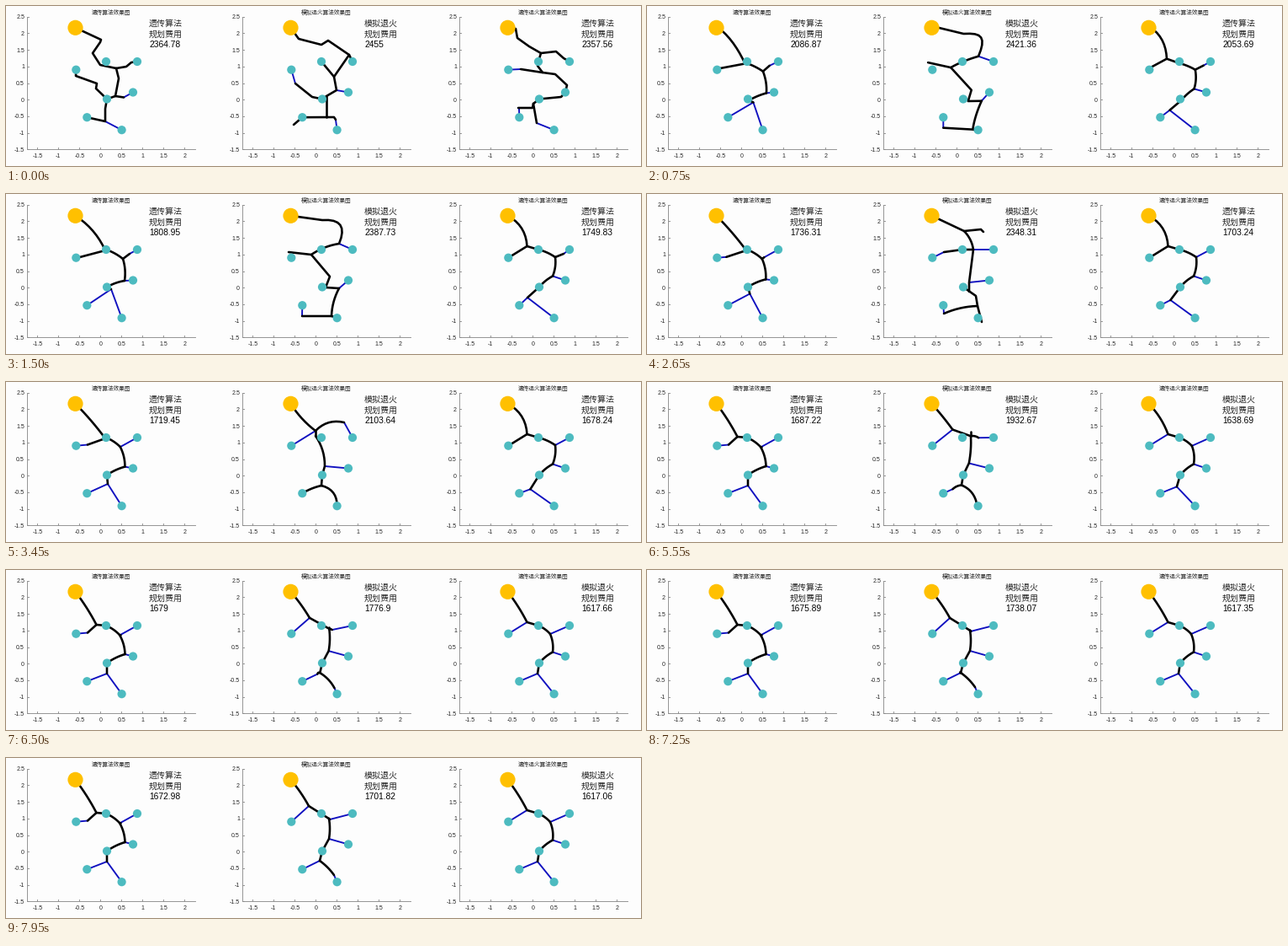
Recreate the animation shown at these times as a matplotlib script. Size 755 by 190 pixels, loop 8000 ms.

```python
import math

import numpy as np
import matplotlib.pyplot as plt
from matplotlib.animation import FuncAnimation
from matplotlib.collections import LineCollection
from matplotlib.patches import Circle

W, H, DPI = 755, 190, 100
STEP, FRAMES = 50, 160
CJK, SANS = "Noto Sans CJK JP", "Liberation Sans"

# the plants, in pixels of the first panel
SUN = (82.5, 25.8)
TOP_L, TOP_R, LEFT, RIGHT = (119, 66), (156, 66), (83.3, 75.7), (151, 102.5)
MID, LOW_L, LOW_R = (120, 110.5), (96.3, 132.2), (137.6, 147.2)
PLANTS = [TOP_L, TOP_R, LEFT, RIGHT, MID, LOW_L, LOW_R]

COST_AT = [0, 1500, 2650, 3450, 4650, 6500, 7950]
REBUILT = 600

fig = plt.figure(figsize=(W / DPI, H / DPI), dpi=DPI, facecolor="#fdfdfd")
ax = fig.add_axes([0, 0, 1, 1])
ax.set_xlim(0, W)
ax.set_ylim(H, 0)
ax.axis("off")


def pt(px):
    return px * 72 / DPI


def put(x, y, s, size, font=SANS, ha="center", color="#262626"):
    return ax.text(x, y, s, fontsize=pt(size), family=font, ha=ha,
                   va="baseline", color=color)


def glide(t, a, b, t0=1500, t1=5000):
    """Ease out from a to b between two times."""
    u = min(max((t - t0) / (t1 - t0), 0), 1)
    return np.array(a, float) + (np.array(b, float) - a) * u * (2 - u)


def via(t, a, b, c):
    return glide(t, a, b, 3450, 4650) if t < 4650 else glide(t, b, c, 4650, 7600)


def bow(p, q, h):
    """Arc from p to q that bulges h pixels to the side."""
    p, q = np.array(p, float), np.array(q, float)
    d = q - p
    side = np.array([d[1], -d[0]]) / max(np.hypot(*d), 1e-6)
    s = np.linspace(0, 1, 9)[:, None]
    return list(p + d * s + side * 4 * h * s * (1 - s))


class Panel:
    def __init__(self, dx, title, label, costs, layout):
        self.dx, self.costs, self.layout = dx, costs, layout
        self.draw_axes()
        put(125 + dx, 10, title, 6.7, CJK)
        self.label = put(190 + dx, 24, label, 10, CJK)
        put(190 + dx, 36.8, "规划费用", 10, CJK)
        self.cost = put(170.7 + dx, 48.8, "", 10.2, ha="left", color="black")
        self.links = LineCollection([], colors="#1010c0", linewidths=pt(1.9),
                                    capstyle="round", zorder=2)
        self.pipes = LineCollection([], colors="black", linewidths=pt(2.6),
                                    capstyle="round", joinstyle="round", zorder=3)
        ax.add_collection(self.links)
        ax.add_collection(self.pipes)
        for x, y in PLANTS:
            ax.add_patch(Circle((x + dx, y), 5.1, fc="#4dbbc0", ec="none", zorder=4))
        ax.add_patch(Circle((SUN[0] + dx, SUN[1]), 9.1, fc="#ffc000", ec="none", zorder=4))

    def draw_axes(self):
        dx = self.dx
        style = dict(color="#8c8c8c", lw=pt(0.9))
        ax.plot([25 + dx, 25 + dx, 225 + dx], [12.7, 170.3, 170.3], **style)
        for v in np.arange(-1.5, 2.1, 0.5):
            x = 112.3 + 50 * v + dx
            ax.plot([x, x], [170.3, 168.3], **style)
            put(x, 179.6, f"{v:g}", 7)
        for v in np.arange(-1.5, 2.6, 0.5):
            y = 111.2 - 39.4 * v
            ax.plot([25 + dx, 27 + dx], [y, y], **style)
            put(22 + dx, y + 2.5, f"{v:g}", 7, ha="right")

    def show(self, t):
        pipes, links = self.layout(t)
        shift = (self.dx, 0)
        self.pipes.set_segments([np.array(p, float) + shift for p in pipes])
        self.links.set_segments([np.array(p, float) + shift for p in links])
        self.cost.set_text(f"{np.interp(t, COST_AT, self.costs):.6g}")


def tree(j, k, m, n, left, right, sag):
    """Spine through the plants with a junction per side branch."""
    pipes = [bow(SUN, j, sag) + [TOP_L], [j, left], bow(TOP_L, k, 1), [k, right],
             bow(k, m, 1.5), bow(m, MID, -1) + [n]]
    links = [(left, LEFT), (right, TOP_R), (m, RIGHT), (n, LOW_L), (n, LOW_R)]
    return pipes, links


def ga_layout(t):
    if t < REBUILT:
        a, b, c = (131, 74), (130, 107), (118, 137)
        return [
            [SUN, (113, 40), (112, 43), (103, 56), (112, 70), a],
            [a, (143, 72), (149, 67), TOP_R],
            [a, (134, 86), b, (140, 108.5)],
            [b, MID, (118, 122), c, LOW_L],
            [LEFT, (83, 83), (108, 92), (107, 98), MID],
        ], [((140, 108.5), RIGHT), (c, LOW_R)]
    return tree(j=glide(t, (118, 67), (107.5, 65), 3450, 4650),
                k=glide(t, (139, 77), (135, 77)),
                m=glide(t, (141, 103), (141.5, 100)),
                n=glide(t, (125, 113), (120, 123)),
                left=glide(t, (84, 76), (97, 74.5), 1500, 3600),
                right=glide(t, (147, 71), (136, 77), 2000, 3450),
                sag=glide(t, 4, 1, 1500, 2650))


def mix_layout(t):
    if t < REBUILT:
        a, b, c = (122, 56), (124, 79), (113, 116)
        return [
            [SUN, (92, 27), (94, 38), (108, 48), a, TOP_L, (118, 71), b],
            [a, (140, 54), (149, 62), TOP_R],
            [(98, 75), b, (139, 81), (153, 94), RIGHT, (146, 108), MID, c],
            [c, (112, 121), (95, 121)],
            [c, (117, 139)],
        ], [((98, 75), LEFT), ((96, 121), LOW_L), ((117, 139), LOW_R)]
    j = (105.5, 62)
    n = glide(t, (106, 123), (110, 128), 1500, 4650)
    return tree(j=j, n=glide(t, n, (118, 123), 4650, 6500),
                k=glide(t, (139, 75), (133, 76), 4000, 6500), m=(136, 97.5),
                left=glide(t, LEFT, j, 3450, 4650),
                right=glide(t, (149, 71), (139, 75), 1500, 2650)
                if t < 2650 else glide(t, (139, 75), (133, 76), 4000, 6500),
                sag=glide(t, 6, 1, 4650, 6500))


def sa_early(t):
    if t < REBUILT:
        a, b, c = (134, 84), (137, 100), (88, 92)
        return [
            [SUN, (92, 39), (119, 46), (127, 41), (152, 58), a],
            [(152, 58), TOP_R],
            [TOP_L, a, b, (125, 107), MID],
            [c, (108, 108), MID],
            [(125, 107), (125, 132)],
            [(86, 141), LOW_L, (134, 132), (136, 135)],
        ], [(b, RIGHT), (c, LEFT), ((136, 135), LOW_R)]
    if t < 2100:
        a, b, c, d = (140, 59), (107, 72), (140, 112), (131, 145)
        return [
            [SUN] + bow((120, 31), a, 14) + bow(a, b, -2) + [(80, 69)],
            [b, (129, 98), (124, 111), c],
            bow(c, d, -2),
            [(96, 145), d, LOW_R],
        ], [(a, TOP_R), (c, RIGHT), ((96, 145), LOW_L)]
    a, b, c, d = (121, 44), (132, 66), (127, 105), (137, 133)
    return [
        [SUN, a, (141, 42), (144, 45)],
        bow(a, b, 2) + [c, (127, 116)],
        [(97, 69), TOP_L, b],
        [MID, (135, 121), d, (142, 152)],
        bow(d, (97, 142), -2),
    ], [((97, 69), LEFT), (b, TOP_R), (c, RIGHT), ((97, 142), LOW_L)]


def sa_layout(t):
    if t < 3050:
        return sa_early(t)
    j = via(t, (112, 58), (111, 56), (104, 57))
    k = via(t, (112, 64), (130, 56), (128, 72))
    arm = via(t, (146, 48), (148, 59), (129, 73))
    m = via(t, (123, 100), (125.5, 97), (128, 96))
    n = via(t, (119, 123), (119, 123), (117, 122))
    low_l = via(t, LOW_L, LOW_L, n)
    low_r = via(t, LOW_R, LOW_R, (134, 139))
    spike = k - (0, via(t, 0, 11, 0))
    pipes = [bow(SUN, j, via(t, -2, 0, 1)), [j, k],
             bow(k if t >= 3600 else j, arm, via(t, 5, 2, 0)), [k, spike],
             bow(k, m, via(t, 3, 1, 1)) + [MID, n],
             bow(n, low_l, -1), bow(n, low_r, via(t, 6, 6, 1))]
    links = [(j, LEFT), (arm, TOP_R), (m, RIGHT), (low_l, LOW_L), (low_r, LOW_R)]
    return pipes, links


def restless(layout, until, size):
    """Let a layout sway between its resting moments early in the search."""
    def swaying(t):
        pipes, links = layout(t)
        if t >= until:
            return pipes, links
        amp = size * math.sin(math.pi * t / until)

        def sway(p):
            x, y = p
            return (x + amp * math.sin(y / 18 + t / 100),
                    y + amp * math.sin(x / 15 + t / 125))

        return ([[sway(p) for p in line] for line in pipes],
                [(sway(p), plant) for p, plant in links])
    return swaying


panels = [
    Panel(0, "遗传算法效果图", "遗传算法",
          [2364.78, 1808.95, 1736.31, 1719.45, 1695, 1679, 1672.98],
          restless(ga_layout, 1500, 1.5)),
    Panel(256, "模拟退火算法效果图", "模拟退火",
          [2455, 2387.73, 2348.31, 2103.64, 2080.24, 1776.9, 1701.82],
          restless(sa_layout, 1500, 2)),
    Panel(514, "遗传退火算法效果图", "遗传算法",
          [2357.56, 1749.83, 1703.24, 1678.24, 1658.61, 1617.66, 1617.06],
          restless(mix_layout, 1500, 1.5)),
]


def update(frame):
    t = frame * STEP
    for panel in panels:
        panel.show(t)
    panels[2].label.set_text("遗传算法" if t < 4500 else "模拟退火")
    return []


anim = FuncAnimation(fig, update, frames=FRAMES, interval=STEP,
                     init_func=lambda: update(0), repeat=True, repeat_delay=0)
plt.show()
```
